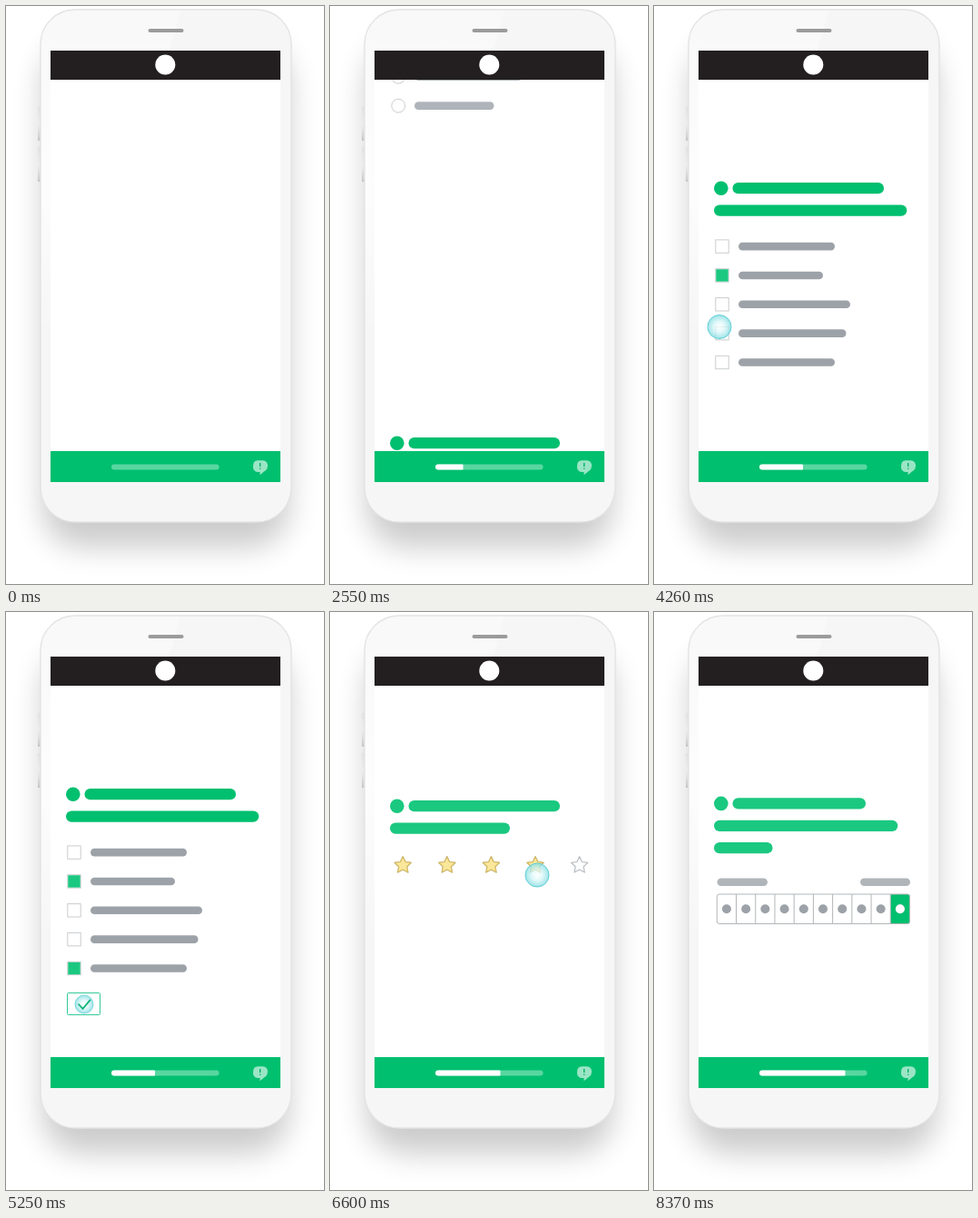
An HTML page that plays this animation: 350x635 px, repeating every 8.76 s.

```html
<!DOCTYPE html>
<html lang="en">
<head>
<meta charset="utf-8">
<title>Mobile survey</title>
<style>
  html, body { margin: 0; width: 100%; height: 100%; overflow: hidden; background: #fff; }
  svg { display: block; width: 350px; height: 635px; }
</style>
</head>
<body>
<svg id="stage" viewBox="0 0 350 635" xmlns="http://www.w3.org/2000/svg">
  <defs>
    <filter id="soft" x="-30%" y="-20%" width="160%" height="140%"><feGaussianBlur stdDeviation="16"/></filter>
    <clipPath id="screen"><rect x="49" y="81" width="253" height="408"/></clipPath>
    <clipPath id="track"><rect x="116" y="503.4" width="118.5" height="6" rx="3"/></clipPath>
    <clipPath id="body"><rect x="38" y="4" width="276" height="563" rx="38"/></clipPath>
    <linearGradient id="side" x1="0" y1="0" x2="0" y2="1">
      <stop offset="0" stop-color="#ddd" stop-opacity=".7"/>
      <stop offset=".5" stop-color="#eee" stop-opacity=".6"/>
      <stop offset="1" stop-color="#c4c4c4"/>
    </linearGradient>
    <linearGradient id="sheen" x1="0" y1="0" x2="0" y2="1">
      <stop offset="0" stop-color="#fff" stop-opacity=".3"/>
      <stop offset=".4" stop-color="#fff" stop-opacity=".75"/>
      <stop offset=".75" stop-color="#fff" stop-opacity="0"/>
    </linearGradient>
    <radialGradient id="touch">
      <stop offset="0" stop-color="#fff" stop-opacity=".75"/>
      <stop offset=".45" stop-color="#d9f6f7" stop-opacity=".75"/>
      <stop offset="1" stop-color="#86dde2" stop-opacity=".8"/>
    </radialGradient>
  </defs>

  <rect x="40" y="40" width="272" height="555" rx="44" fill="#000" opacity=".2" filter="url(#soft)"/>
  <rect x="35" y="111" width="4" height="37" fill="url(#side)"/>
  <rect x="35" y="155" width="4" height="38" fill="url(#side)"/>
  <rect x="38" y="4" width="276" height="563" rx="38" fill="#f6f6f6"/>
  <path d="M38 4H192L60 480H38Z" fill="url(#sheen)" clip-path="url(#body)"/>
  <rect x="38" y="4" width="276" height="563" rx="38" fill="none" stroke="#e3e3e5" stroke-width="1.4"/>
  <rect x="156.5" y="25" width="39" height="4" rx="2" fill="#9b9b9b"/>
  <rect x="49" y="49" width="253" height="440" fill="#fff"/>
  <rect x="49" y="49" width="253" height="32" fill="#231f20"/>
  <circle cx="175.3" cy="64.5" r="11" fill="#fff"/>

  <g clip-path="url(#screen)" id="pages"></g>

  <rect x="49" y="489" width="253" height="34" fill="#00bf6f"/>
  <g clip-path="url(#track)">
    <rect x="116" y="503" width="119" height="7" fill="#fff" opacity=".35"/>
    <rect id="fill" x="116" y="503" width="0" height="7" rx="1.5" fill="#fff"/>
  </g>
  <path d="M277 499.3h6a5 5.5 0 0 1 5 6q0 4-4 6.300l-4.500 3.600v-3.200h-2.500a5 5.500 0 0 1-5-6.500q0-6.200 5-6.200Z" fill="#fff" opacity=".6"/>
  <path d="M279.700 502v4M279.700 507.500v1.300" stroke="#00a862" stroke-width="1.300"/>

  <g id="cursor" opacity="0">
    <circle r="13" fill="url(#touch)" stroke="#5fcfd6" stroke-width="1"/>
  </g>
</svg>
<script>
const LOOP = 8760, STEP = 30, TRAVEL = 560;
const GREEN = '#00bf6f', MINT = '#1bc880';
const $ = id => document.getElementById(id);
const times = (n, make) => Array.from({ length: n }, (_, i) => make(i)).join('');

const span = (t, from, to) => Math.min(1, Math.max(0, (t - from) / (to - from)));
const inOut = k => k < .5 ? 2 * k * k : 1 - 2 * (1 - k) ** 2;
const out = k => 1 - (1 - k) ** 2;
const backOut = (k, s = 3.2) => 1 + (s + 1) * (k - 1) ** 3 + s * (k - 1) ** 2;

// Rounded bar from x1 to x2, centred on y
const bar = (x1, x2, y, h, color) =>
  `<rect class="bar" data-w="${x2 - x1}" x="${x1}" y="${y - h / 2}" width="${x2 - x1}" height="${h}" rx="${h / 2}" fill="${color}"/>`;

const heading = (x, y, color, ends) =>
  `<circle class="bullet" cx="${x + 7.8}" cy="${y}" r="7.8" fill="${color}"/>` +
  ends.map((end, i) => bar(i ? x : x + 20.5, end, y + 24.4 * i, 12.3, color)).join('');

const starPath = (cx, cy) => 'M' + Array.from({ length: 10 }, (_, i) => {
  const r = i % 2 ? 4.7 : 9.6, a = Math.PI * (i / 5 - .5);
  return `${(cx + r * Math.cos(a)).toFixed(2)} ${(cy + r * Math.sin(a)).toFixed(2)}`;
}).join('L') + 'Z';

const rowY = (top, i) => top + 31.85 * i;

function radioPage() {
  const ends = [168.5, 199, 243, 211.5, 180.5];
  return heading(65, 180.2, GREEN, [252, 277.5, 160]) + times(5, i => {
    const y = rowY(262.2, i);
    return `<g class="option"><circle cx="75.2" cy="${y}" r="7.4" fill="#fff" stroke="#c9cccf"/>
      ${i === 2 ? `<circle id="radio" cx="75.2" cy="${y}" r="7.400" fill="${MINT}" opacity="0"/>` : ''}
      ${bar(93, ends[i], y, 8.6, '#aeb4b9')}</g>`;
  });
}

function checkPage() {
  const ends = [199, 186, 216, 211.5, 199];
  return heading(66, 200.2, GREEN, [253, 278.3]) + times(5, i => {
    const y = rowY(264.1, i);
    return `<rect x="67.800" y="${y - 7.2}" width="14.400" height="14.400" fill="#fff" stroke="#c9cccf"/>
      <rect class="box" x="68.300" y="${y - 6.7}" width="13.400" height="13.400" fill="${MINT}" opacity="0"/>
      ${bar(93, ends[i], y, 8.6, '#9ca2a8')}`;
  }) + `<g id="confirm" opacity="0">
      <rect x="67.500" y="418.500" width="36" height="24" rx="1" fill="#fff" stroke="#35c99a"/>
    </g>`;
}

function starPage() {
  return heading(66, 213.2, MINT, [253, 198]) + times(5, i => {
    const d = starPath(80.2 + 48.6 * i, 278.3);
    const join = 'stroke-width="1.2" stroke-linejoin="round"';
    return `<path d="${d}" fill="#fff" stroke="#b9bcc0" ${join}/>
      <path class="star" d="${d}" fill="#fbe79a" stroke="#d3b962" ${join} opacity="0"/>`;
  });
}

function scalePage() {
  const left = 69.3, w = 21.22, top = 310, h = 32.5;
  return heading(66, 210.4, MINT, [233, 268.3, 130.5]) +
    bar(69.5, 125, 296.7, 8.6, '#b0b5b9') + bar(227, 282, 296.7, 8.6, '#b0b5b9') +
    `<rect x="${left}" y="${top}" width="${w * 10}" height="${h}" rx="2.500" fill="#fff"/>
     <path id="cell" d="M${left + w * 9} ${top}h${w - 2}q2 0 2 2v${h - 4}q0 2-2 2h${2 - w}Z" fill="${GREEN}" opacity="0"/>
     <rect x="${left}" y="${top}" width="${w * 10}" height="${h}" rx="2.500" fill="none" stroke="#b2b6b9"/>` +
    times(9, i => `<path d="M${left + w * (i + 1)} ${top}v${h}" stroke="#b2b6b9"/>`) +
    times(10, i => `<circle class="dot" cx="${left + w * (i + .5)}" cy="326.200" r="5" fill="#9ca2a8"/>`) +
    `<circle id="chosen" cx="${left + w * 9.5}" cy="326.200" r="5" fill="#fff" opacity="0"/>`;
}

$('pages').innerHTML = [radioPage, checkPage, starPage, scalePage].map(make => `<g class="page">${make()}</g>`).join('') +
  `<path id="tick" d="M79.500 430.500l5 5.300 8.500-10" fill="none" stroke="#14b57a" stroke-width="1.800"/>`;
$('stage').append($('tick'));

const pages = [...document.querySelectorAll('.page')];
const intro = {
  bullet: pages[0].querySelector('.bullet'),
  lines: [...pages[0].children].filter(el => el.matches('.bar')),
  options: [...pages[0].querySelectorAll('.option')]
};
const boxes = document.querySelectorAll('.box');
const stars = document.querySelectorAll('.star');

const slides = [[2280, 2820], [5280, 5860], [6680, 7260]];
// from, to, width added to the progress bar
const progress = [[180, 650, 24], [2460, 2790, 24], [5470, 5790, 23.5], [6870, 7240, 23]];
// path: time, x, y
const touches = [
  { from: 1500, to: 2280, taps: [2000], path: [[1500, 169, 417], [1920, 80, 329]] },
  { from: 3030, to: 3810, taps: [3660], path: [[3110, 176, 285], [3600, 82, 301]] },
  { from: 4020, to: 5340, taps: [4500, 5250], path: [[4080, 72, 299], [4420, 72, 395], [4700, 72, 395], [5060, 86, 431]] },
  { from: 6000, to: 6700, taps: [6470], path: [[6040, 192, 339], [6400, 228, 289]] },
  { from: 7560, to: 8370, taps: [8080], path: [[7600, 243, 381], [8000, 276, 330]] }
];

const fade = (el, t, from, length = 90) => el.setAttribute('opacity', span(t, from, from + length));
const grow = (el, k) => el.setAttribute('width', el.dataset.w * k);

function drawIntro(t) {
  const k = span(t, 180, 480);
  intro.bullet.setAttribute('r', k ? Math.max(0, 7.8 * backOut(k)) : 0);
  intro.lines.forEach((line, i) => grow(line, out(span(t, 210 + 60 * i, 510 + 60 * i))));
  intro.options.forEach((option, i) => {
    const start = 330 + 45 * i;
    fade(option, t, start, 150);
    grow(option.querySelector('.bar'), out(span(t, start, start + 240)));
  });
}

function drawCursor(t) {
  const touch = touches.find(a => t >= a.from && t < a.to);
  if (!touch) return $('cursor').setAttribute('opacity', 0);
  const { path, taps, from, to } = touch;
  let [, x, y] = path[0];
  path.slice(1).forEach(([end, nx, ny], i) => {
    const k = inOut(span(t, path[i][0], end));
    x += (nx - path[i][1]) * k;
    y += (ny - path[i][2]) * k;
  });
  const press = Math.max(...taps.map(tap => Math.max(0, 1 - Math.abs(t - tap) / 120)));
  $('cursor').setAttribute('opacity', Math.min(1, (t - from + STEP) / 90, (to - t) / 90));
  $('cursor').setAttribute('transform', `translate(${x} ${y}) scale(${1 - .23 * press})`);
}

function draw(t) {
  const moved = slides.map(([from, to]) => inOut(span(t, from, to)));
  const shift = pages.map((_, i) => TRAVEL * ((i ? 1 - moved[i - 1] : 0) - (moved[i] || 0)));
  pages.forEach((page, i) => {
    page.setAttribute('transform', `translate(0 ${shift[i]})`);
    page.setAttribute('visibility', Math.abs(shift[i]) < TRAVEL ? 'visible' : 'hidden');
  });

  drawIntro(t);
  fade($('radio'), t, 2000);
  fade(boxes[1], t, 3660);
  fade(boxes[4], t, 4500);
  fade($('confirm'), t, 4590, 150);
  stars.forEach((star, i) => i < 4 && fade(star, t, 6410 + 30 * i, 60));
  fade($('cell'), t, 8080);
  fade($('chosen'), t, 8080);

  $('tick').setAttribute('transform', `translate(0 ${shift[1]})`);
  $('tick').setAttribute('opacity', shift[1] > -350 ? span(t, 4590, 4740) : 0);
  $('fill').setAttribute('width', progress.reduce((w, [from, to, add]) => w + add * span(t, from, to), 0));
  drawCursor(t);
}

const began = performance.now();
function tick() {
  const t = (performance.now() - began) % LOOP;
  draw(Math.floor(t / STEP) * STEP);
  requestAnimationFrame(tick);
}
tick();
</script>
</body>
</html>
```
